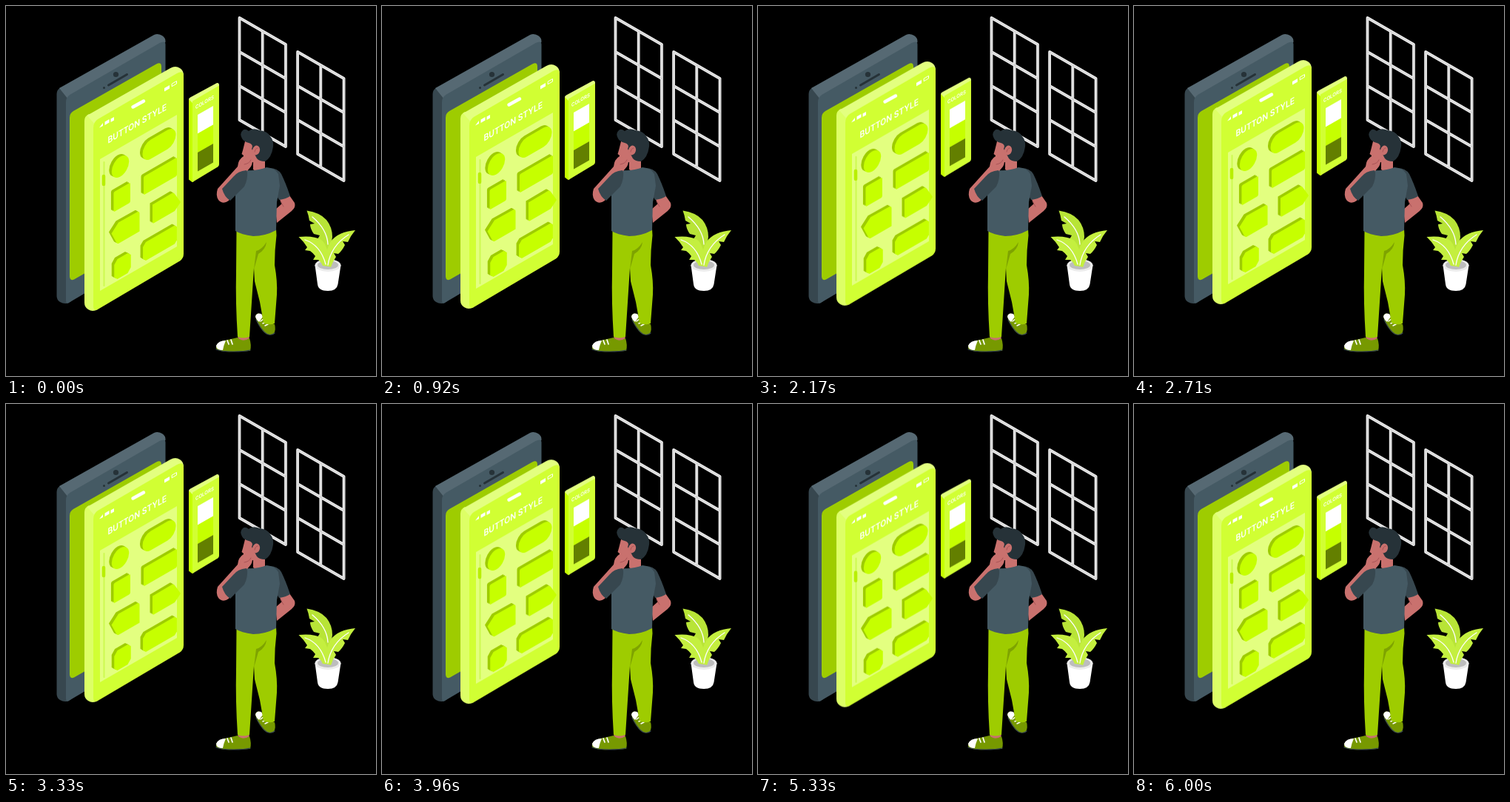
These frames come from a looping animation (500 px wide and 500 px high, 6040 ms). An HTML page without scripts:

```html
<!DOCTYPE html>
<html lang="en">
<head>
<meta charset="utf-8">
<title>Button style</title>
<style>
html, body { margin: 0; width: 100%; height: 100%; overflow: hidden; background: #000; }
svg { display: block; width: 100vw; height: 100vh; }
text { font-family: Inter, "Open Sans", sans-serif; font-weight: 600; fill: #fff; }
.float { animation: float 6.04s linear infinite; }
@keyframes float { 50% { transform: translateY(-10px); } }
.slate { fill: #455a64; }
.deep { fill: #37474f; }
.ink { fill: #263238; }
.skin { fill: #c9716e; }
.olive { fill: #9ecc00; }
.moss { fill: #779900; }
.lime { fill: #c6ff00; }
.face { fill: #d1ff33; }
.side { fill: #ddff66; }
.rim { fill: #e3ff80; }
.white { fill: #fff; }
.line { fill: none; stroke-linecap: round; stroke-linejoin: round; }
</style>
</head>
<body>
<svg viewBox="0 0 500 500">
<defs>
  <g id="bars">
    <path d="M315.500 16 378 52V190L315.500 154ZM346.700 34V172M315.500 62 378 98M315.500 108 378 144"/>
  </g>
  <g id="window" class="line">
    <use href="#bars" stroke="#ebebeb" stroke-width="3.800"/>
    <use href="#bars" stroke="#c4c4c4" stroke-width=".8" x=".5" y=".3"/>
  </g>
  <g id="buttons">
    <circle r="13.500" transform="matrix(.866 -.5 0 1 154.500 217)"/>
    <rect x="-26" y="-13" width="52" height="26" rx="13" transform="matrix(.866 -.5 0 1 207 187)"/>
    <rect x="-13" y="-13.500" width="26" height="27" rx="2" transform="matrix(.866 -.5 0 1 156.700 258.500)"/>
    <rect x="-26" y="-12.500" width="52" height="25" rx="2" transform="matrix(.866 -.5 0 1 208.500 230)"/>
    <path d="M142.500 307.500 152 292.500 178 278Q180.500 277.500 180.500 280V304.500L152 321Q150 321.500 149 319.500Z"/>
    <path d="M198 268.500 225 252.500Q227 252 228 254L236 265 228 277 199.500 293.500Q198 294 198 292Z"/>
    <path d="M-13 -8 -8 -13.500H8L13 -9V8L8 13.500H-8L-13 9Z" transform="matrix(.866 -.5 0 1 157.500 351.500)"/>
    <path d="M-26.500 -8 -22 -12.500H23L26.500 -9V9L23 12.500H-22L-26.500 8Z" transform="matrix(.866 -.5 0 1 208 320.500)"/>
  </g>
</defs>
<rect width="500" height="500"/>

<use href="#window"/>
<use href="#window" x="78.600" y="46"/>

<!-- dark phone -->
<g>
  <path class="deep" d="M68.500 119Q68.500 113 74 110L88 118V399L84 401.500Q78 403 73 400 68.500 397 68.500 392Z"/>
  <path fill="#566973" d="M72 111 200 39Q205 36.500 211 40 216 43 215.500 49L84 126Z"/>
  <path class="slate" d="M81 130Q81 123 87 119.500L205 51.500Q215.500 45.500 215.500 52V324L84 401.500Q81 402 81 398Z"/>
  <path class="olive" d="M86 151Q86 145 91 142L203 78.500Q210 75 210 82V302L92 369.500Q86 372 86 365Z"/>
  <circle class="ink" cx="148.500" cy="92.500" r="3.600"/>
  <circle class="ink" cx="132.500" cy="110.500" r="1.500"/>
  <path class="line" d="M138.500 107 163.500 92.500" stroke="#263238" stroke-width="3"/>
</g>

<g class="float">
  <!-- light phone -->
  <path class="side" d="M106 155Q106 149 112 146L124 152V410Q117 414 111 410 106 407 106 401Z"/>
  <path class="rim" d="M109.500 148 222 84Q229 80 235 84 240 87 240 94L122 162Z"/>
  <path class="face" d="M118 165Q118 157 124 153L231 91Q240 86 240 95V335Q240 341 235 344.500L124 410Q118 413 118 405Z"/>
  <path class="rim" d="M127 207 231 147V325L127 385Z"/>
  <path class="line" d="M132.500 211V378" stroke="#cdfa51" stroke-width="2"/>
  <path class="line" d="M132 230V241" stroke="#b8ef00" stroke-width="4.500"/>

  <path class="white" d="M126 164.500 131 158V162ZM133.500 156.500 139.500 153V157.500L133.500 161ZM141.500 152.500 146 150V154.500L141.500 157ZM214 111 221 107V111.500L214 115.500Z"/>
  <path class="line" d="M171.500 136.500 186 128.500" stroke="#fff" stroke-width="4.500"/>
  <path class="line" d="M224.500 105 230.500 101.500V105L224.500 108.500Z" stroke="#fff"/>
  <text font-size="12" transform="matrix(.866 -.5 0 1 137.500 186)">BUTTON STYLE</text>

  <g class="olive">
    <use href="#buttons" x="-3.500" y="-2"/>
    <use href="#buttons" x="-1.800" y="-1"/>
  </g>
  <use href="#buttons" class="lime"/>

  <!-- colour card -->
  <path class="lime" d="M247 126 254 126V237L251.500 238 247 234.500Z"/>
  <path class="rim" d="M247 126Q247 124.500 249 123.500L285 104Q288 103.500 288 107V112L252 131Z"/>
  <path class="face" d="M252 128.500 288 107.500V214Q288 216 286 217.500L252 238Z"/>
  <text font-size="7" transform="matrix(.866 -.5 0 1 256 139.500)">COLORS</text>
  <path class="white" d="M259 147 280 135V160.500L259 172.500Z"/>
  <path class="lime" d="M259 172.500 280 160.500V186L259 198Z"/>
  <path fill="#637f00" d="M259 198 280 186V211.500L259 223.500Z"/>
</g>

<!-- plant -->
<g>
  <path class="white" d="M417.500 350 421 376Q422 385 435 385 447 385 448.500 376L452.500 350Z"/>
  <ellipse cx="435" cy="350.500" rx="17.500" ry="8.500" fill="#ececec"/>
  <ellipse cx="435" cy="350" rx="14" ry="6" fill="#bdbdbd"/>
  <path fill="#b8e437" d="M406.500 276.500Q424 279 433 289 441 299 441 312L437 340 431 336Q428 324 421 315L424 310 416 308Q411 301 411 295L417 294 410 290Q409 283 406.500 276.500Z"/>
  <g fill="#c4ef3f">
    <path d="M472 303Q466 310 462 319L455 318 458 323Q454 331 449 335L443 334 446 339Q441 346 439 353L431 350Q431 331 439 318 449 305 472 303Z"/>
    <path d="M395.500 312Q416 310 426 316 436 323 437 352L428 351Q426 346 422 343L415 343 418 338Q414 333 411 331L404 330 407 326Q402 318 395.500 312Z"/>
  </g>
  <path class="line" d="M414 285Q434 302 435 322M463 309Q439 324 435 350M404 316Q425 323 432 349" stroke="#fff" stroke-width="1.300"/>
</g>

<!-- man -->
<g>
  <path class="skin" d="M348 419 363 421 360 434 349 433ZM313 443H329L328 457H314Z"/>
  <path class="moss" d="M337 419Q339 413 346 417L352 428 363 430Q365 437 362 443 354 447 347 439 338 428 337 419Z"/>
  <path class="white" d="M337 420Q338 414 345 416L347 420 342 427Q338 424 337 420Z"/>
  <path class="line" d="M344 426 348 423M347 429 351 427M350 432 354 430" stroke="#fff" stroke-width="1.500"/>
  <path class="line" d="M338 424Q348 443 355 444 360 445 363 442" stroke="#37474f" stroke-width="1.200"/>
  <path class="moss" d="M284 459Q287 453 300 451L313 448Q320 455 329 449 332 458 330 466L308 467Q288 468 284 463Z"/>
  <path class="white" d="M284 459Q287 452 297 452 294 459 293 465 284 465 284 459Z"/>
  <path class="line" d="M299 452 301 457M304 451 306 457" stroke="#fff" stroke-width="1.700"/>
  <path class="line" d="M284 464Q290 467 308 467 322 467 330 465" stroke="#37474f" stroke-width="1.200"/>

  <path class="olive" d="M311.500 302Q337 313 365 301L365.500 310Q363 330 363 350 367 372 366 390L363 429Q355 432 348 428L343 400 336 372 335 354 333 385 329 447Q320 450 313 447 310 400 311 360Z"/>
  <path fill="#7ea300" d="M335 356 338 331Q346 329 352 319 351 329 341 335Z"/>

  <path class="skin" d="M369 260 383 256 390 266Q392 272 386 277L366 293 364 275 373 267Z"/>
  <path class="line" d="M371 264 375 271" stroke="#a95457"/>
  <path class="deep" d="M356 219Q367 219 372 227 378 239 384 257 378 261 369 262L360 247Z"/>

  <path class="skin" d="M323 183 320 195 318.500 200 321 202 321 209Q324 214 334 211V221Q342 227 350 221V198L345 182Z"/>
  <path class="slate" d="M322 222Q341 223 352 218 364 219 368 227L370 243 366 265 365 303Q350 311 334 311 318 309 310 304V252Z"/>
  <path class="skin" d="M321 203Q314 207 313 217L286 247Q283 256 287 262 293 269 301 263L315 236 331 217Q335 210 330 205Z"/>
  <path class="deep" d="M325 222Q313 223 307 231L292 247Q295 258 303 263L322 244Q327 234 326 224Z"/>
  <path class="ink" d="M319 179Q315 172 320 168 323 165 328 169 333 164 343 168 353 169 357 176 362 182 361 190 359 205 350 210 342 210 339 206L332 193Q335 187 328 185 321 183 319 179Z"/>
  <ellipse class="skin" cx="338" cy="195" rx="5" ry="6.500" transform="rotate(15 338 195)"/>
  <path class="line" d="M336 197Q337 192 340 192M322 214Q329 213 331 208" stroke="#a95457"/>
</g>
</svg>
</body>
</html>
```
